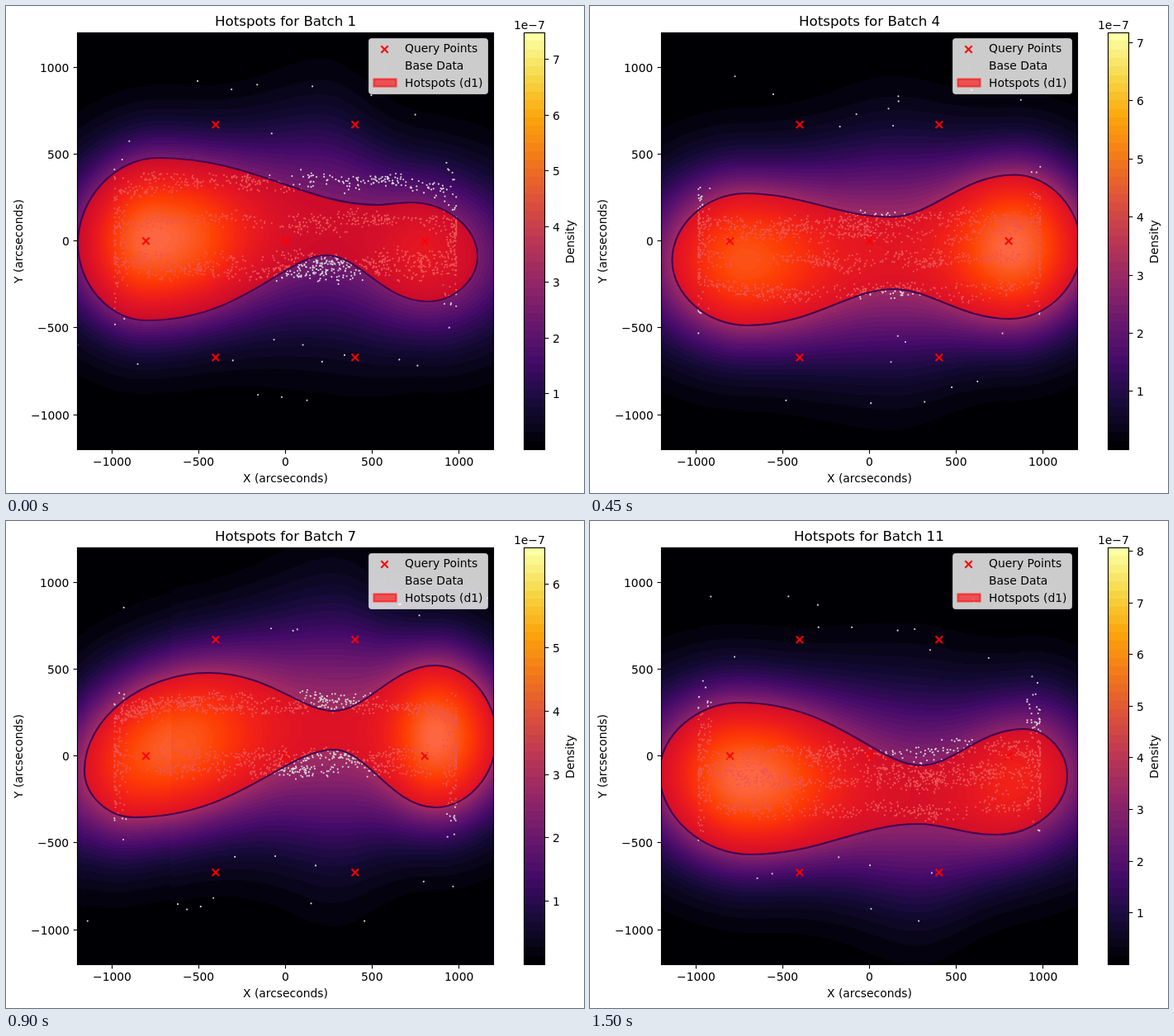
Recreate the animation shown at these times as an HTML page with a canvas. Size 700 by 590 pixels, loop 1650 ms.

```html
<!DOCTYPE html>
<html lang="en">
<head>
<meta charset="utf-8">
<title>Hotspots</title>
<style>
  html, body { margin: 0; width: 100%; height: 100%; overflow: hidden; background: #fff; }
  canvas { display: block; }
</style>
</head>
<body>
<canvas id="stage" width="700" height="590"></canvas>
<script>
const STEP = 150, COUNT = 11, BANDS = 49, SIGMA = 67;
const BOX = { x: 86, y: 32, w: 504, h: 505 };
const MID = { x: 338.3, y: 284.8 };
const FONT = '"DejaVu Sans", sans-serif';

// edge: left, top-left, top waist, top-right, right, bottom-right, bottom waist, bottom-left
// tracks: heights of the rows of data points
const batches = {
  1: {
    max: 7.48, tracks: [213, 262, 308, 322],
    edge: [87,288, 184,184, 450,241, 490,238, 571,303, 510,358, 388,302, 170,381]
  },
  3: {
    max: 7.2, tracks: [268, 281, 318, 345],
    edge: [101,318, 203,237, 368,264, 505,218, 592,300, 505,384, 384,362, 205,393]
  },
  5: {
    max: 7.14, tracks: [254, 267, 300, 347],
    edge: [98,298, 173,217, 362,247, 523,191, 597,283, 513,374, 350,324, 175,381]
  },
  7: {
    max: 6.58, tracks: [221, 224, 285, 300],
    edge: [95,302, 245,184, 397,230, 520,175, 594,262, 520,347, 397,277, 155,359]
  },
  8: {
    max: 7.04, tracks: [222, 288, 308, 342],
    edge: [90,297, 181,204, 392,254, 494,229, 585,306, 510,370, 390,334, 184,381]
  },
  10: {
    max: 6.29, tracks: [250, 257, 342, 352],
    edge: [104,278, 174,205, 371,306, 520,207, 584,290, 490,387, 367,344, 218,387]
  },
  11: {
    max: 8.07, tracks: [278, 302, 316, 350],
    edge: [84,305, 181,220, 400,296, 525,252, 578,309, 492,380, 398,367, 195,404]
  }
};

const lerp = (a, b, t) => a + (b - a) * t;

function getBatch(n) {
  if (batches[n]) return batches[n];
  const a = batches[n - 1], b = batches[n + 1];
  const mean = key => a[key].map((v, i) => (v + b[key][i]) / 2);
  return { max: (a.max + b.max) / 2, tracks: mean('tracks'), edge: mean('edge') };
}

function seeded(seed) {
  return () => {
    seed = seed + 0x6D2B79F5 | 0;
    let t = Math.imul(seed ^ seed >>> 15, 1 | seed);
    t = t + Math.imul(t ^ t >>> 7, 61 | t) ^ t;
    return ((t ^ t >>> 14) >>> 0) / 4294967296;
  };
}

const STOPS = ['000004', '160b39', '420a68', '6a176e', '932667', 'bc3754',
  'dd513a', 'f37819', 'fca50a', 'f6d746', 'fcffa4']
  .map(h => [0, 2, 4].map(i => parseInt(h.slice(i, i + 2), 16)));
const palette = Array.from({ length: BANDS }, (_, i) => {
  const p = i / (BANDS - 1) * 10, k = Math.min(9, Math.floor(p));
  return STOPS[k].map((v, c) => Math.round(lerp(v, STOPS[k + 1][c], p - k)));
});

// Cubic segments between the extreme points: quarter turns at the ends,
// S-shaped slopes towards the waists.
function segments(edge) {
  return Array.from({ length: 8 }, (_, i) => {
    const j = (i + 1) % 8, side = i % 4;
    const [x0, y0, x3, y3] = [edge[2 * i], edge[2 * i + 1], edge[2 * j], edge[2 * j + 1]];
    const dx = x3 - x0, dy = y3 - y0;
    let k0 = .53, k1 = .53;
    if (side === 1 || side === 2) {
      const onLeft = i === 1 || i === 6;
      const lean = onLeft ? .7 * Math.abs(dy / dx) - .1 : .05;
      const sign = side === 1 ? 1 : -1;
      k0 = .38 + sign * lean;
      k1 = .38 - sign * lean;
    }
    const p1 = side === 0 ? [x0, y0 + k0 * dy] : [x0 + k0 * dx, y0];
    const p2 = side === 3 ? [x3, y3 - k1 * dy] : [x3 - k1 * dx, y3];
    return [x0, y0, ...p1, ...p2, x3, y3];
  });
}

// Height of a chain of segments as a function of x.
function heightOf(segs) {
  const pts = [];
  for (const s of segs) for (let i = 0; i <= 40; i++) {
    const t = i / 40, u = 1 - t;
    const pos = c => u*u*u*s[c] + 3*u*u*t*s[c + 2] + 3*u*t*t*s[c + 4] + t*t*t*s[c + 6];
    pts.push([pos(0), pos(1)]);
  }
  pts.sort((p, q) => p[0] - q[0]);
  return x => {
    const i = Math.max(1, pts.findIndex(p => p[0] >= x));
    const [a, b] = [pts[i - 1], pts[i]];
    return lerp(a[1], b[1], (x - a[0]) / (b[0] - a[0] || 1));
  };
}

// Every column is a bell curve that meets the same level on both sides of the outline.
function profile(edge, segs) {
  const top = heightOf(segs.slice(0, 4)), bottom = heightOf(segs.slice(4));
  const lobe = (up, low, tip) => ({
    x: (edge[up] + edge[low]) / 2,
    h: (edge[low + 1] - edge[up + 1]) / 2,
    tip: edge[tip], c: edge[tip + 1]
  });
  const l = lobe(2, 14, 0), r = lobe(6, 10, 8);
  return Array.from({ length: BOX.w }, (_, i) => {
    const x = BOX.x + i + .5;
    if (x <= l.tip || x >= r.tip) {
      const e = x <= l.tip ? l : r;
      return { c: e.c, h2: e.h ** 2 * (1 - ((x - e.x) / (e.tip - e.x)) ** 2), s: SIGMA };
    }
    const t = top(x), b = bottom(x), h = (b - t) / 2, f = (x - l.x) / (r.x - l.x);
    const narrowing = f > 0 && f < 1 ? Math.max(0, lerp(l.h, r.h, f) - h) : 0;
    return { c: (t + b) / 2, h2: h * h, s: SIGMA + .45 * narrowing };
  });
}

function drawDensity(c, edge, segs) {
  const cols = profile(edge, segs), img = c.createImageData(BOX.w, BOX.h);
  const bell = (p, dy) => Math.exp((p.h2 - dy * dy) / (2 * p.s * p.s));
  const peak = Math.max(...cols.map(p => bell(p, 0)));
  for (let y = 0, o = 0; y < BOX.h; y++) {
    for (const p of cols) {
      const d = bell(p, BOX.y + y + .5 - p.c) / peak;
      const rgb = palette[Math.min(BANDS - 1, Math.floor(d * BANDS))];
      img.data.set(rgb, o);
      img.data[o + 3] = 255;
      o += 4;
    }
  }
  c.putImageData(img, BOX.x, BOX.y);
}

function drawPoints(c, tracks, seed) {
  const rnd = seeded(seed * 977);
  const spread = s => (rnd() + rnd() + rnd() - 1.5) * 2 * s;
  const dot = (x, y) => {
    c.moveTo(x + 1.1, y);
    c.arc(x, y, 1.1, 0, 7);
  };
  c.fillStyle = '#d3d3d3';
  c.beginPath();
  // clumps along each track, which bends towards the middle near both ends
  for (const y0 of tracks) {
    for (let k = 0; k < 34; k++) {
      const u = 1.96 * rnd() - .98, dy = spread(5);
      for (let i = 0; i < 10; i++) {
        const v = Math.max(-1, Math.min(1, u + spread(.06)));
        dot(MID.x + 207 * v, y0 + dy + (MID.y - y0) * .25 * v ** 6 + spread(3));
      }
    }
  }
  for (const side of [-1, 1]) {
    for (let i = 0; i < 110; i++) dot(MID.x + side * (207 - 16 * rnd() ** 2), 287 + spread(40));
  }
  for (let i = 0; i < 20; i++) {
    dot(MID.x + spread(110), MID.y + (rnd() < .5 ? -1 : 1) * (110 + 90 * rnd()));
  }
  c.fill();
}

function cross(c, x, y) {
  c.strokeStyle = '#f00';
  c.lineWidth = 2.08;
  line(c, x - 4.2, y - 4.2, x + 4.2, y + 4.2);
  line(c, x - 4.2, y + 4.2, x + 4.2, y - 4.2);
}

function line(c, x0, y0, x1, y1) {
  c.beginPath();
  c.moveTo(x0, y0);
  c.lineTo(x1, y1);
  c.stroke();
}

// align: 0 left, .5 centre, 1 right; the start snaps to whole pixels
function text(c, str, x, y, align = 0, size = 13.89) {
  c.font = `${size}px ${FONT}`;
  c.fillStyle = '#000';
  c.fillText(str, Math.round(x - align * c.measureText(str).width), Math.round(y));
}

function upright(c, str, x, y) {
  c.save();
  c.translate(x, y);
  c.rotate(-Math.PI / 2);
  text(c, str, 0, 0, .5);
  c.restore();
}

function drawAxes(c, n) {
  c.strokeStyle = '#000';
  c.lineWidth = 1.11;
  c.strokeRect(86.5, 32.5, 504, 505);
  for (let v = -1000; v <= 1000; v += 500) {
    const x = Math.floor(MID.x + v * .21) + .5, y = Math.floor(MID.y - v * .2103) + .5;
    const label = String(v).replace('-', '\u2212');
    line(c, x, 537.5, x, 542.4);
    line(c, 86.5, y, 81.6, y);
    text(c, label, x, 557, .5);
    text(c, label, 76.6, y + 5.2, 1);
  }
  text(c, `Hotspots for Batch ${n}`, MID.x, 24, .5, 16.67);
  text(c, 'X (arcseconds)', MID.x, 577, .5);
  upright(c, 'Y (arcseconds)', 20, 285);
}

function drawLegend(c) {
  c.beginPath();
  c.roundRect(439.5, 39.5, 144, 67, 3);
  c.fillStyle = 'rgba(255,255,255,.8)';
  c.fill();
  c.strokeStyle = 'rgba(204,204,204,.8)';
  c.lineWidth = 1;
  c.stroke();
  cross(c, 458.5, 52.5);
  c.fillStyle = '#d3d3d3';
  c.fillRect(457.5, 72.5, 2, 2);
  c.fillStyle = c.strokeStyle = 'rgba(255,0,0,.6)';
  c.fillRect(445.5, 88.5, 27, 9);
  c.strokeRect(445.5, 88.5, 27, 9);
  ['Query Points', 'Base Data', 'Hotspots (d1)'].forEach((s, i) => text(c, s, 483, 56 + i * 21));
}

function drawScale(c, max) {
  const h = BOX.h / BANDS;
  palette.forEach((rgb, i) => {
    const top = Math.round(537 - (i + 1) * h);
    c.fillStyle = `rgb(${rgb})`;
    c.fillRect(627, top, 25, Math.round(537 - i * h) - top);
  });
  c.strokeStyle = '#000';
  c.lineWidth = 1.11;
  c.strokeRect(627.5, 32.5, 25, 505);
  for (let v = 1; v <= max; v++) {
    const y = Math.floor(537.3 - v / max * BOX.h) + .5;
    line(c, 652.5, y, 657.4, y);
    text(c, String(v), 662, y + 5.2);
  }
  text(c, '1e\u22127', 652.8, 28, 1);
  upright(c, 'Density', 688, 286);
}

function render(n) {
  const { max, tracks, edge } = getBatch(n);
  const cv = document.createElement('canvas');
  cv.width = 700;
  cv.height = 590;
  const c = cv.getContext('2d');
  c.fillStyle = '#fff';
  c.fillRect(0, 0, 700, 590);
  const segs = segments(edge);
  drawDensity(c, edge, segs);

  c.save();
  c.beginPath();
  c.rect(BOX.x, BOX.y, BOX.w, BOX.h);
  c.clip();
  for (const dx of [-84.4, 84.4]) for (const dy of [-141, 141]) cross(c, MID.x + dx, MID.y + dy);
  for (const dx of [-168.8, 0, 168.8]) cross(c, MID.x + dx, MID.y);
  drawPoints(c, tracks, n);
  c.beginPath();
  c.moveTo(edge[0], edge[1]);
  for (const s of segs) c.bezierCurveTo(...s.slice(2));
  c.closePath();
  c.fillStyle = 'rgba(255,0,0,.6)';
  c.fill();
  c.strokeStyle = '#440154';
  c.lineWidth = 2.08;
  c.stroke();
  c.restore();

  drawAxes(c, n);
  drawLegend(c);
  drawScale(c, max);
  return cv;
}

const views = Array.from({ length: COUNT }, (_, i) => render(i + 1));
const ctx = document.getElementById('stage').getContext('2d');
const start = performance.now();

function tick() {
  const t = (performance.now() - start) % (COUNT * STEP);
  ctx.drawImage(views[Math.floor(t / STEP)], 0, 0);
  requestAnimationFrame(tick);
}
tick();
</script>
</body>
</html>
```
